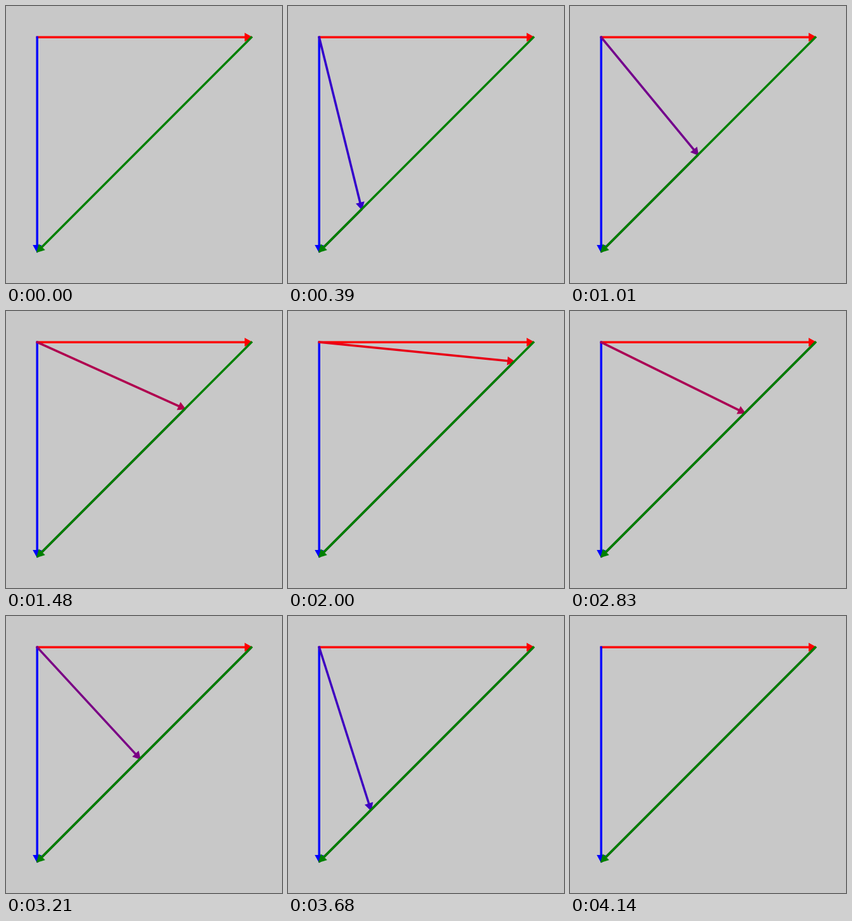
Animation of 436 by 437 pixels, one loop 4.16 s. Source, as an HTML page with a canvas:

```html
<!DOCTYPE html>
<html>
<head>
<meta charset="utf-8">
<style>
html, body { margin: 0; overflow: hidden; background: #c8c8c8; }
canvas { display: block; }
</style>
</head>
<body>
<canvas id="stage" width="436" height="437"></canvas>
<script>
const ctx = document.getElementById('stage').getContext('2d');
const LOOP = 4160, PEAK = 2170, O = 49.25, L = 338.5;
const WIDTH = 3.5, HEAD = 10.8, HALF = 7, POINT = 2;

// [time in ms, mix between the blue (0) and red (1) vectors]
const KEYS = [[0, 0], [530, .27], [1010, .452], [1600, .75], [2000, .91],
  [PEAK, 1], [3210, .48], [3740, .211], [4140, 0], [LOOP, 0]];

function mixAt(t) {
  const i = KEYS.findIndex(k => k[0] > t);
  const [t0, a] = KEYS[i - 1], [t1, b] = KEYS[i];
  return a + (b - a) * (t - t0) / (t1 - t0);
}

const pointAt = m => [O + L * m, O + L * (1 - m)];

function line(x0, y0, x1, y1, color) {
  ctx.strokeStyle = color;
  ctx.lineWidth = WIDTH;
  ctx.beginPath();
  ctx.moveTo(x0, y0);
  ctx.lineTo(x1, y1);
  ctx.stroke();
}

// The head's point reaches slightly past the end of the vector.
function arrow(x0, y0, x1, y1, color) {
  const len = Math.hypot(x1 - x0, y1 - y0);
  const ux = (x1 - x0) / len, uy = (y1 - y0) / len;
  const bx = x1 - ux * HEAD, by = y1 - uy * HEAD;
  line(x0 - ux * 1.5, y0 - uy * 1.5, bx + ux, by + uy, color);
  ctx.fillStyle = color;
  ctx.beginPath();
  ctx.moveTo(x1 + ux * POINT, y1 + uy * POINT);
  ctx.lineTo(bx - uy * HALF, by + ux * HALF);
  ctx.lineTo(bx + uy * HALF, by - ux * HALF);
  ctx.fill();
}

function draw(now) {
  const t = now % LOOP, m = mixAt(t);
  const red = pointAt(1), blue = pointAt(0);
  ctx.clearRect(0, 0, 436, 437);
  arrow(O, O, ...red, '#f00');
  arrow(O, O, ...blue, '#00f');
  if (m > 0) arrow(O, O, ...pointAt(m), `rgb(${255 * m}, 0, ${255 * (1 - m)})`);
  // path swept by the moving tip
  line(...blue, ...pointAt(t < PEAK ? m : 1), '#000');
  arrow(...red, ...blue, '#008000');
}

let start;
function tick(now) {
  start ??= now;
  draw(now - start);
  requestAnimationFrame(tick);
}
draw(0);
requestAnimationFrame(tick);
</script>
</body>
</html>
```
